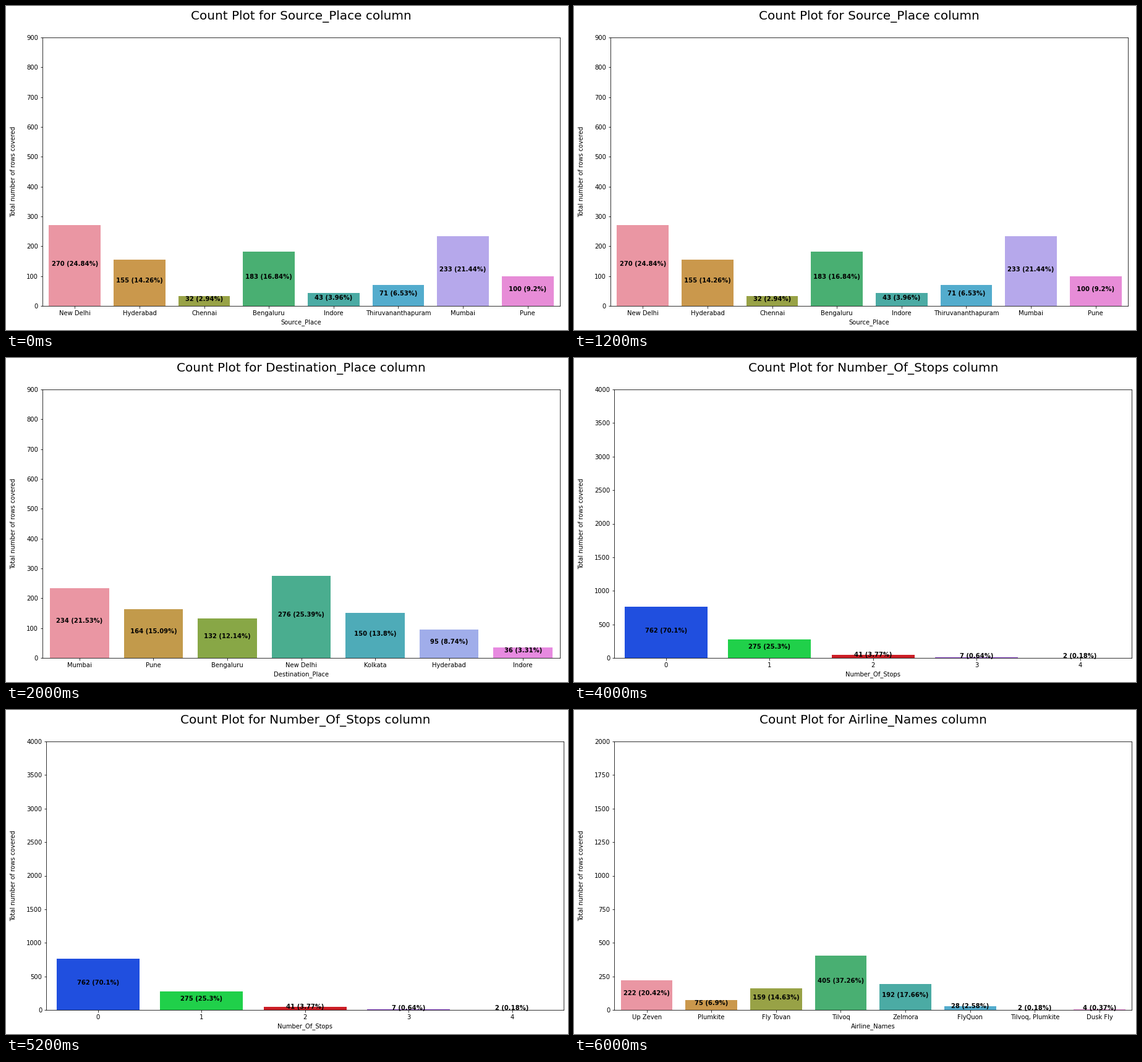
Recreate the animation shown at these times as a matplotlib script. Size 909 px wide and 525 px high, loop 8 s.

```python
import colorsys
import math

import matplotlib.pyplot as plt
from matplotlib.animation import FuncAnimation
from matplotlib.colors import to_rgb

WIDTH, HEIGHT, DPI = 909, 525, 72
AXES_BOTTOM, AXES_W, AXES_H = 39.06, 837, 434.88
TOTAL_ROWS = 1087

XYZ_TO_RGB = [(3.2406, -1.5372, -0.4986),
              (-0.9689, 1.8758, 0.0415),
              (0.0557, -0.2040, 1.0570)]


def max_chroma(light, sin_h, cos_h):
    """Largest chroma inside the RGB gamut for a lightness and hue."""
    y = (light + 16) ** 3 / 1560896
    limits = []
    for m1, m2, m3 in XYZ_TO_RGB:
        top = (0.99915 * m1 + 1.05122 * m2 + 1.14460 * m3) * y
        bottom = ((0.86330 * m3 - 0.17266 * m2) * sin_h
                  + (0.12949 * m3 - 0.38848 * m1) * cos_h) * y
        for t in (0, 1):
            limits.append(light * (top - 1.05122 * t) / (bottom + 0.17266 * sin_h * t))
    return min(c for c in limits if c > 0)


def gamma(c):
    c = 12.92 * c if c <= 0.0031308 else 1.055 * c ** (1 / 2.4) - 0.055
    return min(max(c, 0), 1)


def husl(hue, sat, light):
    """Perceptually even hue to RGB, by way of CIE LUV."""
    angle = math.radians(hue)
    sin_h, cos_h = math.sin(angle), math.cos(angle)
    chroma = max_chroma(light, sin_h, cos_h) * sat / 100
    u = chroma * cos_h / (13 * light) + 0.19784
    v = chroma * sin_h / (13 * light) + 0.46834
    y = ((light + 16) / 116) ** 3
    x = 9 * y * u / (4 * v)
    z = (9 * y - 15 * v * y - v * x) / (3 * v)
    return [gamma(a * x + b * y + c * z) for a, b, c in XYZ_TO_RGB]


def desaturate(color, amount=0.75):
    h, l, s = colorsys.rgb_to_hls(*to_rgb(color))
    return colorsys.hls_to_rgb(h, l, s * amount)


def even_hues(n):
    return [husl((i / n + 0.01) * 359, 0.9 * 99, 0.7 * 99) for i in range(n)]


BRIGHT = ["#003FFF", "#03ED3A", "#E8000B", "#8A2BE2", "#FFC400"]

# column, left edge of the axes, y limit, y step, palette, counts
CHARTS = [
    ("Source_Place", 59.02, 900, 100, even_hues(8),
     {"New Delhi": 270, "Hyderabad": 155, "Chennai": 32, "Bengaluru": 183,
      "Indore": 43, "Thiruvananthapuram": 71, "Mumbai": 233, "Pune": 100}),
    ("Destination_Place", 59.02, 900, 100, even_hues(7),
     {"Mumbai": 234, "Pune": 164, "Bengaluru": 132, "New Delhi": 276,
      "Kolkata": 150, "Hyderabad": 95, "Indore": 36}),
    ("Number_Of_Stops", 65.3, 4000, 500, BRIGHT,
     {"0": 762, "1": 275, "2": 41, "3": 7, "4": 2}),
    ("Airline_Names", 65.3, 2000, 250, even_hues(8),
     {"Up Zeven": 222, "Plumkite": 75, "Fly Tovan": 159, "Tilvoq": 405,
      "Zelmora": 192, "FlyQuon": 28, "Tilvoq, Plumkite": 2, "Dusk Fly": 4}),
]

plt.rcParams.update({"font.family": "DejaVu Sans", "font.size": 10})
fig = plt.figure(figsize=(WIDTH / DPI, HEIGHT / DPI), dpi=DPI, facecolor="white")
ax = fig.add_axes([0, 0, 1, 1])


def draw(index):
    column, left, limit, step, palette, counts = CHARTS[index]
    ax.clear()
    ax.set_position([left / WIDTH, AXES_BOTTOM / HEIGHT,
                     AXES_W / WIDTH, AXES_H / HEIGHT])
    places = range(len(counts))
    ax.bar(places, counts.values(), width=0.8,
           color=[desaturate(c) for c in palette])
    for x, count in zip(places, counts.values()):
        share = round(100 * count / TOTAL_ROWS, 2)
        ax.text(x, count / 2, f"{count} ({share}%)", weight="bold",
                ha="center", va="baseline")
    ax.set_xlim(-0.5, len(counts) - 0.5)
    ax.set_ylim(0, limit)
    ax.set_xticks(places, list(counts))
    ax.set_yticks(range(0, limit + 1, step))
    # The trailing line breaks leave a blank line next to the axes.
    ax.set_xlabel(column)
    ax.set_ylabel("Total number of rows covered\n")
    ax.set_title(f"Count Plot for {column} column\n", fontsize=20)
    return []


anim = FuncAnimation(fig, draw, frames=len(CHARTS), interval=2000,
                     init_func=lambda: draw(0), repeat=True, repeat_delay=0)
plt.show()
```
